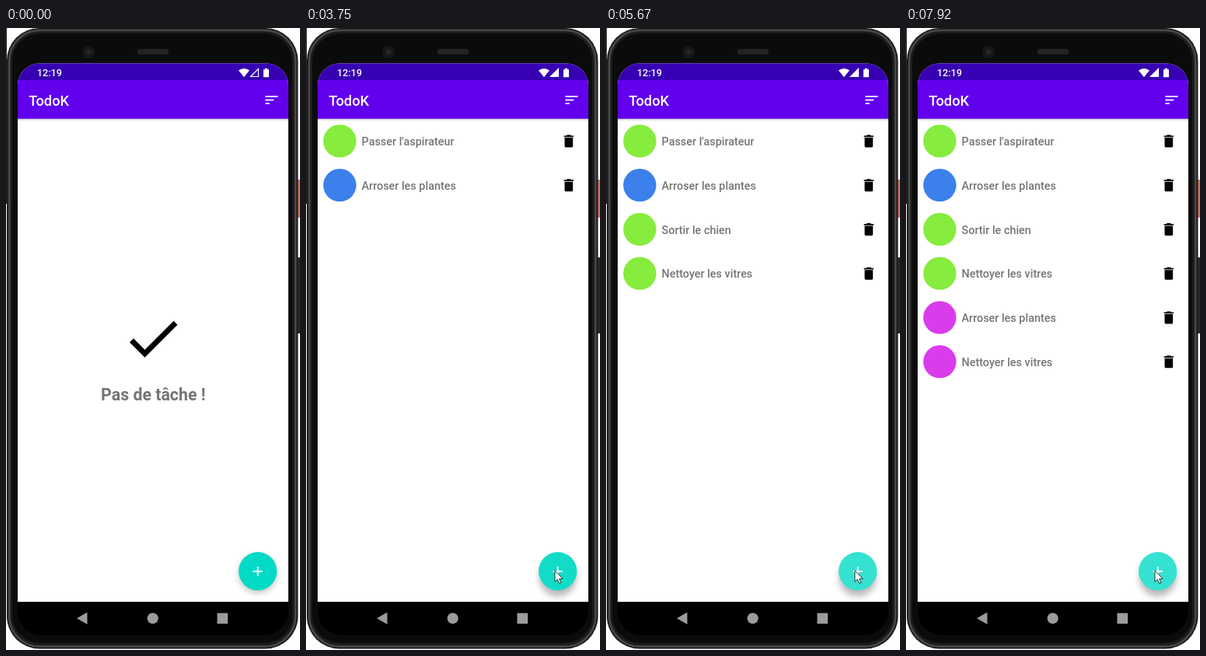
Recreate the animation shown at these times as an HTML page. Size 378 by 800 pixels, loop 8 s.

```html
<!DOCTYPE html>
<html lang="fr">
<head>
<meta charset="utf-8">
<title>TodoK</title>
<style>
  html, body { margin: 0; width: 100%; height: 100%; overflow: hidden; background: #fff; }
  svg { display: block; width: 378px; height: 800px; font-family: Roboto, sans-serif; font-weight: 500; }
  .shadow { filter: blur(4px); }
  .soft { filter: blur(.7px); }
</style>
</head>
<body>
<svg viewBox="0 0 378 800">
  <defs>
    <linearGradient id="barShade" x2="0" y2="1">
      <stop offset="0" stop-color="#000" stop-opacity=".25"/>
      <stop offset="1" stop-color="#000" stop-opacity="0"/>
    </linearGradient>
    <clipPath id="screen">
      <path d="M15 738V73.500a28 28 0 0 1 28-28H335a28 28 0 0 1 28 28V738z"/>
    </clipPath>
    <path id="trash" d="M6 19c0 1.1.9 2 2 2h8c1.1 0 2-.9 2-2V7H6v12zM19 4h-3.5l-1-1h-5l-1 1H5v2h14V4z"/>
  </defs>

  <!-- phone body -->
  <rect width="1" height="226" fill="#222"/>
  <rect x="372" y="195" width="6" height="49" rx="1" fill="#d8705f"/>
  <rect x="372" y="295" width="6" height="98" rx="1" fill="#292929"/>
  <rect x="1" y="0" width="374.5" height="798.5" rx="42" fill="#1c1c1c"/>
  <rect class="soft" x="4.200" y="3" width="368" height="792.500" rx="39" fill="none" stroke="#484848" stroke-width="2.600"/>
  <rect x="8" y="7" width="360" height="784" rx="36" fill="#0b0b0b"/>
  <path d="M15 738H363V750a31 31 0 0 1-31 31H46a31 31 0 0 1-31-31z"/>
  <circle cx="106" cy="31" r="8" fill="#171717"/>
  <circle cx="106" cy="31" r="3.5" fill="#26262a"/>
  <rect x="169" y="27" width="40" height="7" rx="2.5" fill="#232323"/>

  <g clip-path="url(#screen)">
    <rect x="15" y="45" width="348" height="693" fill="#fff"/>
    <rect x="15" y="116" width="348" height="4" fill="url(#barShade)"/>
    <rect x="15" y="45" width="348" height="22.500" fill="#3700b3"/>
    <rect x="15" y="67" width="348" height="49.700" fill="#6200ee"/>
    <g fill="#fff">
      <text x="39.800" y="62.400" font-size="12.7">12:19</text>
      <text x="29.200" y="99.500" font-size="18.3">TodoK</text>
      <path d="M299 54.500Q306 49.500 313 54.500L306 63.300z"/>
      <path d="M314.500 62.500H324.500V52.500z" fill="none" stroke="#fff" stroke-width="1.2"/>
      <path id="signal" d="M313.500 63H325V51.800z"/>
      <path d="M331 53.200h2v-1.400h3v1.400h2V63.200h-7z"/>
      <path transform="translate(330.700 82) scale(.9 .887)" d="M3 18h6v-2H3zM3 6v2h18V6zM3 13h12v-2H3z"/>
    </g>
    <g id="empty">
      <path transform="translate(147 357.200) scale(3.5)" d="M9 16.170 4.830 12 3.410 13.410 9 19 21 7 19.590 5.590z"/>
      <text x="189.300" y="478.500" font-size="21.3" font-weight="700" fill="#757575" text-anchor="middle">Pas de tâche !</text>
    </g>
    <g id="rows"></g>
    <circle id="shade" class="shadow" cx="323.700" r="24"/>
    <circle cx="323.700" cy="698.700" r="24.600" fill="#03dac5"/>
    <circle id="tint" cx="323.700" cy="698.700" r="24.600" fill="#fff"/>
    <path d="M317.500 698.900h12.400M323.700 692.700v12.400" stroke="#fff" stroke-width="1.8"/>
  </g>

  <g fill="#9c9c9c">
    <path d="M91 759.300 104.500 751.500V767z"/>
    <circle cx="188.700" cy="759.300" r="7"/>
    <rect x="271.500" y="752.500" width="13.700" height="13.700" rx="1"/>
  </g>
  <path id="cursor" d="M320 697.800v14.500l3.300-3.100 2.300 5.300 2.400-1-2.300-5.200h4.500z" fill="#fff" stroke="#222" stroke-width=".9"/>
</svg>

<script>
const LOOP = 8000, SIGNAL_AT = 1250, CURSOR_AT = 1920;
const GREEN = '#86ec3d', BLUE = '#3c80eb', PINK = '#d93ceb';
const tasks = [
  [2750, GREEN, "Passer l'aspirateur"],
  [3670, BLUE, 'Arroser les plantes'],
  [4580, GREEN, 'Sortir le chien'],
  [5330, GREEN, 'Nettoyer les vitres'],
  [6250, PINK, 'Arroser les plantes'],
  [7170, PINK, 'Nettoyer les vitres'],
];
const $ = id => document.getElementById(id);

$('rows').innerHTML = tasks.map(([, color, label], i) => `
  <g transform="translate(0 ${i * 56.75})">
    <circle cx="43.400" cy="145.400" r="21.200" fill="${color}"/>
    <text x="71.500" y="151.200" font-size="14.4" fill="#757575">${label}</text>
    <use href="#trash" transform="translate(327.200 134.900) scale(.887)"/>
  </g>`).join('');
const rows = [...$('rows').children];

const show = (el, on) => { el.style.display = on ? '' : 'none'; };
const ramp = (t, start, length) => Math.min(1, Math.max(0, (t - start) / length));

function render(t) {
  rows.forEach((row, i) => show(row, t >= tasks[i][0]));
  show($('empty'), t < tasks[0][0]);
  show($('signal'), t >= SIGNAL_AT);
  show($('cursor'), t >= CURSOR_AT);
  // the button rises under the pointer and brightens once pressed
  const lift = .6 * ramp(t, CURSOR_AT, 70) + .4 * ramp(t, 3600, 150);
  $('shade').setAttribute('cy', 702 + 5 * lift);
  $('shade').setAttribute('opacity', .28);
  $('tint').setAttribute('opacity', .06 * ramp(t, 2700, 150) + .14 * ramp(t, 4500, 150));
}

const start = performance.now();
function tick() {
  render((performance.now() - start) % LOOP);
  requestAnimationFrame(tick);
}
render(0);
requestAnimationFrame(tick);
</script>
</body>
</html>
```
